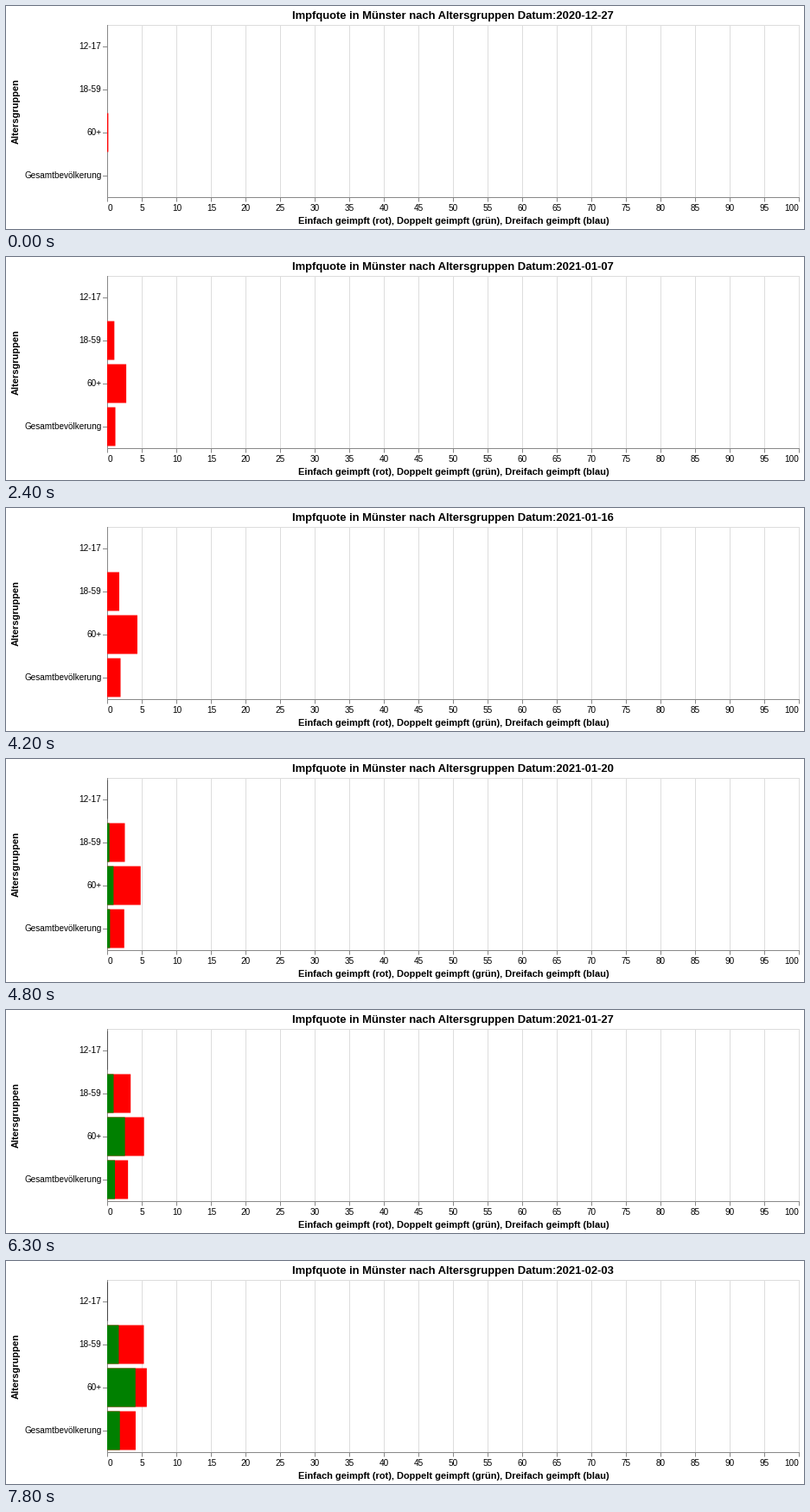
Animation, 923 px wide and 259 px high, one loop 8000 ms. Source, as a matplotlib script:

```python
import numpy as np
import matplotlib.pyplot as plt
from matplotlib.animation import FuncAnimation
from matplotlib.patches import Rectangle

W, H, DPI = 923, 259, 64
LEFT, RIGHT, TOP, BOTTOM = 117, 917, 22, 222
UNIT = (RIGHT - LEFT) / 100      # pixels per percent
BAND = 50
PX = 72 / DPI                    # points per pixel
GROUPS = ["12-17", "18-59", "60+", "Gesamtbevölkerung"]

# Reporting days, counted from 2020-12-27
DAYS = [0, 1, 2, 3, 6, 8, 9, 10, 11, 12, 13, 14, 16, 18, 20,
        23, 24, 25, 27, 29, 30, 31, 32, 33, 36, 37, 38]
DATES = [str(np.datetime64("2020-12-27") + d) for d in DAYS]

# Quota in percent at a few reporting steps, per age group
STEPS = [0, 4, 11, 14, 18, 23, 26]
FIRST = {
    1: [0, 0.62, 1.36, 1.75, 3.37, 3.42, 5.31],
    2: [0.17, 1.62, 3.62, 4.37, 5.31, 5.35, 5.73],
    3: [0, 0.70, 1.56, 1.94, 3.00, 3.03, 4.12],
}
SECOND = {
    1: [0, 0, 0, 0, 0.66, 1.12, 1.68],
    2: [0, 0, 0, 0, 1.85, 3.06, 4.10],
    3: [0, 0, 0, 0, 0.84, 1.32, 1.84],
}

plt.rcParams["font.family"] = "Liberation Sans"
fig = plt.figure(figsize=(W / DPI, H / DPI), dpi=DPI, facecolor="white")
ax = fig.add_axes([0, 0, 1, 1])
ax.set(xlim=(0, W), ylim=(H, 0))
ax.axis("off")


def line(x0, y0, x1, y1, color, z=1):
    return ax.plot([x0, x1], [y0, y1], color=color, lw=PX, zorder=z,
                   solid_capstyle="butt", snap=False)[0]


def label(x, y, text, size, ha="center", **kw):
    return ax.text(x, y, text, fontsize=size * PX, ha=ha, va="baseline",
                   color="black", zorder=5, **kw)


def bar(row, color, z):
    top = TOP + BAND * row + 2.5
    return ax.add_patch(Rectangle((LEFT, top), 0, 45, fc=color, lw=0,
                                  zorder=z, snap=False))


# Grid, frame and axes
line(LEFT, TOP + 0.5, RIGHT + 1, TOP + 0.5, "#ddd")
for value in range(0, 101, 5):
    x = LEFT + value * UNIT + 0.5
    line(x, TOP, x, BOTTOM, "#ddd")
    line(x, BOTTOM, x, BOTTOM + 5.5, "#888", 2)
    ha = {0: "left", 100: "right"}.get(value, "center")
    label(x, 238, str(value), 10, ha)
for row, name in enumerate(GROUPS):
    y = TOP + BAND * (row + 0.5)
    line(LEFT - 5, y + 0.5, LEFT, y + 0.5, "#888", 2)
    label(LEFT - 6.5, y + 3, name, 10, "right")
line(LEFT + 0.5, TOP, LEFT + 0.5, BOTTOM + 1, "#888", 2)
line(LEFT, BOTTOM + 0.5, RIGHT + 1, BOTTOM + 0.5, "#888", 2)

title = label(517, 15, "", 13, weight="bold")
label(517.5, 253, "Einfach geimpft (rot), Doppelt geimpft (grün), "
      "Dreifach geimpft (blau)", 11, weight="bold")
label(15, 122.5, "Altersgruppen", 11, weight="bold", rotation=90,
      rotation_mode="anchor")

bars = [(bar(row, color, z), data[row])
        for data, color, z in ((FIRST, "red", 3), (SECOND, "green", 4))
        for row in data]
sliver = line(LEFT + 0.5, TOP + 2.5, LEFT + 0.5, TOP + 47.5, "#555", 3)


def update(frame):
    step = min(frame // 3, len(DATES) - 1)
    title.set_text(f"Impfquote in Münster nach Altersgruppen Datum:{DATES[step]}")
    for patch, values in bars:
        patch.set_width(np.interp(step, STEPS, values) * UNIT)
    sliver.set_visible(step > 14)
    sliver.set_color("#555" if step < 24 else "#444")
    return [title, sliver, *(patch for patch, _ in bars)]


anim = FuncAnimation(fig, update, frames=80, interval=100, repeat=True,
                     repeat_delay=0, blit=False)
plt.show()
```
